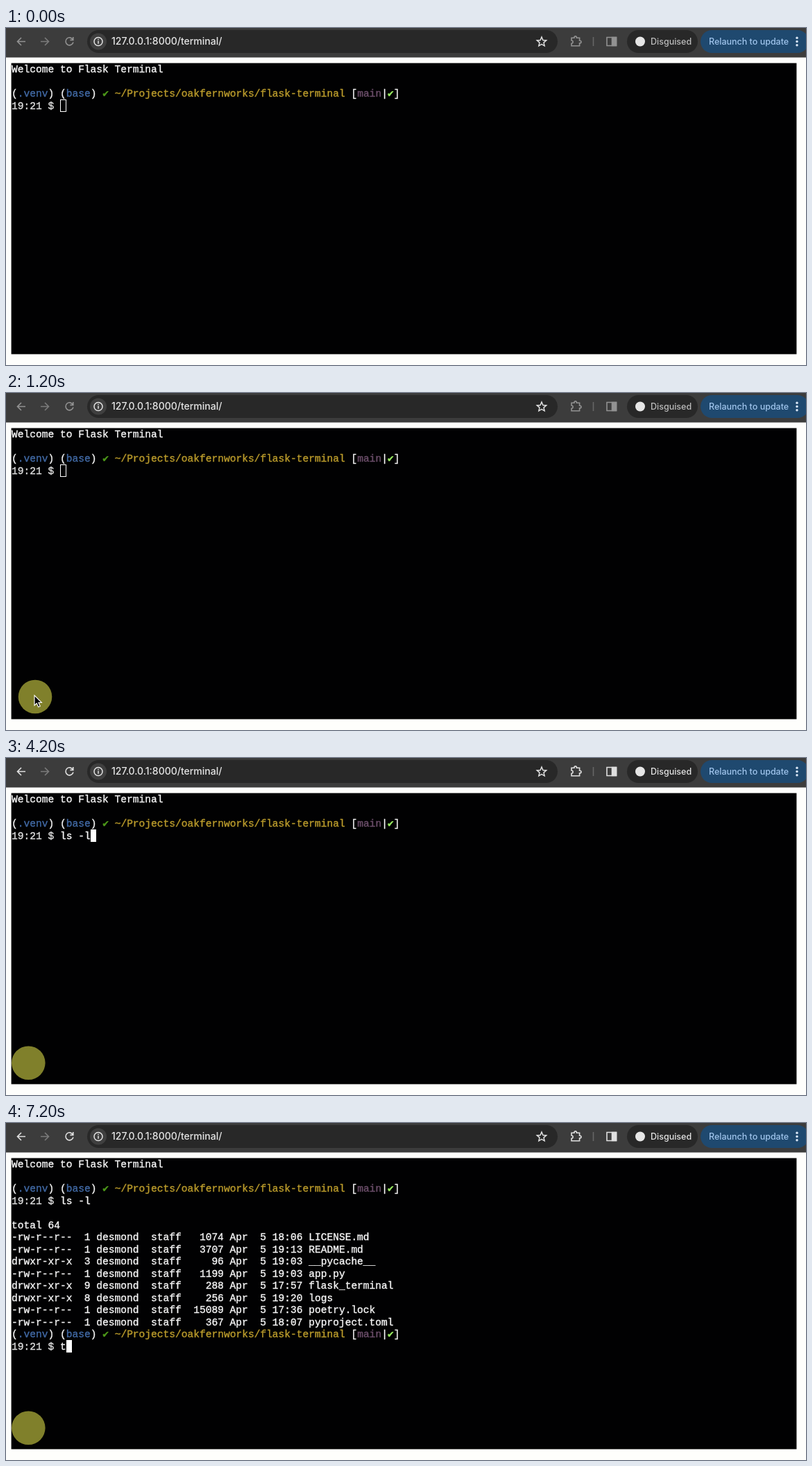
An HTML page for the animation above (8000 ms loop, 1153 by 486 pixels).

```html
<!DOCTYPE html>
<html lang="en">
<head>
<meta charset="utf-8">
<title>Flask Terminal</title>
<style>
  html, body { margin: 0; width: 100%; height: 100%; overflow: hidden; background: #fefefc; }
  #stage { position: relative; width: 1153px; height: 486px; overflow: hidden; }
  #stage > * { position: absolute; }
  svg { left: 0; top: 0; font: 500 12.5px Inter, Roboto, sans-serif; }
  pre {
    left: 8px; top: 52px; margin: 0; color: #f4f4f4;
    font: 14.57px/17.5px "Liberation Mono", "DejaVu Sans Mono", monospace;
    -webkit-text-stroke: .4px currentColor;
  }
  .env { color: #4169a4; } .ok { color: #4e9a1a; } .path { color: #b99a2b; }
  .branch { color: #6a4d68; } .clean { color: #9aed62; } .time { color: #dedede; }
  #caret { box-sizing: border-box; width: 8.7px; height: 17.5px; border: 1px solid #fff; }
  .focused #caret { background: #fff; }
  .tool { color: #929292; } .label { fill: #bcbcbc; }
  .focused .tool { color: #e0e0e0; } .focused .label { fill: #e4e4e4; }
</style>
</head>
<body>
<div id="stage">
  <svg width="1153" height="486" fill="none" stroke-width="1.6">
    <rect x="7.6" y="50.6" width="1131.8" height="419.8" fill="#010102"/>
    <rect width="1153" height="42.5" fill="#3c3c3c"/>
    <rect x="117" y="3" width="678" height="33" rx="16.5" fill="#282828"/>
    <circle cx="133" cy="19.5" r="12" fill="#3f3f3f"/>
    <rect x="895" y="3" width="102" height="33" rx="16.5" fill="#282828"/>
    <rect x="1001" y="3" width="156" height="33" rx="16.5" fill="#1f496f"/>
    <g class="tool" stroke="currentColor">
      <path d="M28 19.5H17M22 14l-5.5 5.5L22 25"/>
      <path d="M96.3 16.6A5.5 5.5 0 1 0 96.9 20.5M96.8 13v4.4h-4.4"/>
      <path d="M815 14.2h4v-.6a1.7 1.7 0 0 1 3.4 0v.6h4.2v4h.6a1.8 1.8 0 0 1 0 3.6h-.6v4H815v-3.6a2.1 2.1 0 0 0 0-4.2z"/>
      <path d="M866 13.5h13.5v12H866z"/>
      <path d="M873.5 13.5h6v12h-6z" fill="currentColor"/>
    </g>
    <path d="M50 19.5H61M56 14l5.5 5.5L56 25" stroke="#7b7b7b"/>
    <path d="M846.5 13v13" stroke="#666"/>
    <g stroke="#e2e2e2" stroke-width="1.5">
      <circle cx="133" cy="19.5" r="6"/>
      <path d="M133 18.6v4.2M133 15.8v1.5"/>
      <path d="M772 13l1.9 4.5 4.8.4-3.7 3.2 1.1 4.7-4.1-2.5-4.1 2.5 1.1-4.7-3.7-3.2 4.8-.4z"/>
    </g>
    <circle cx="914" cy="19.5" r="7" fill="#e6e6e6"/>
    <g fill="#d9e6f5">
      <circle cx="1140" cy="14.3" r="1.7"/><circle cx="1140" cy="19.5" r="1.7"/><circle cx="1140" cy="24.7" r="1.7"/>
    </g>
    <text x="152" y="24.4" font-size="14" fill="#e6e6e6">127.0.0.1:8000/terminal/</text>
    <text x="929" y="24.2" class="label">Disguised</text>
    <text x="1013" y="24.2" fill="#9fc4ec">Relaunch to update</text>
    <g id="pointer">
      <circle r="24.3" fill="#80802b"/>
      <path id="arrow" d="M-1-2v14.5l3.3-3 2.3 5.3 2.6-1.1-2.3-5.2h4.5z" fill="#000" stroke="#fff" stroke-width="1.1"/>
      <g id="beam">
        <path d="M-4-7.5q4 0 4 3v9q0 3-4 3M4-7.5q-4 0-4 3M4 7.5q-4 0-4-3M-2.5 2h5" stroke="#fff" stroke-width="3"/>
        <path d="M-4-7.5q4 0 4 3v9q0 3-4 3M4-7.5q-4 0-4 3M4 7.5q-4 0-4-3M-2.5 2h5" stroke="#111" stroke-width="1.2"/>
      </g>
    </g>
  </svg>
  <pre id="text"></pre>
  <div id="caret"></div>
</div>
<script>
const LOOP = 8000, FOCUS = 1600, ENTER = 5200;
const COLUMN = 8.743, ROW = 17.5;
const $ = id => document.getElementById(id);
const span = (cls, s) => `<span class="${cls}">${s}</span>`;

const prompt = `(${span('env', '.venv')}) (${span('env', 'base')}) ${span('ok', '✔')} ` +
  span('path', '~/Projects/oakfernworks/flask-terminal') +
  ` [${span('branch', 'main')}|${span('clean', '✔')}]\n${span('time', '19:21 $')} `;

const FILE = '-rw-r--r--', DIR = 'drwxr-xr-x';
const listing = [
  [FILE, 1, 1074, '18:06', 'LICENSE.md'],
  [FILE, 1, 3707, '19:13', 'README.md'],
  [DIR, 3, 96, '19:03', '__pycache__'],
  [FILE, 1, 1199, '19:03', 'app.py'],
  [DIR, 9, 288, '17:57', 'flask_terminal'],
  [DIR, 8, 256, '19:20', 'logs'],
  [FILE, 1, 15089, '17:36', 'poetry.lock'],
  [FILE, 1, 367, '18:07', 'pyproject.toml'],
].map(([mode, links, size, time, name]) =>
  `${mode}  ${links} desmond  staff${String(size).padStart(7)} Apr  5 ${time} ${name}\n`).join('');

// [time, key]
const keys = [[2600, 'l'], [2800, 's'], [3800, ' '], [4000, '-'], [4200, 'l'], [7200, 't']];
// [time, x, y]
const moves = [[800, 89, 163], [1000, 54, 160], [1200, 42, 438], [1600, 34, 437], [2200, 32.3, 439.7]];

const typed = (from, to) => keys.filter(([at]) => at >= from && at <= to).map(k => k[1]).join('');
const show = (id, on) => $(id).style.display = on ? '' : 'none';
let shown = '';

function draw(t) {
  const done = t >= ENTER;
  const first = typed(0, Math.min(t, ENTER - 1));
  const input = done ? typed(ENTER, t) : first;
  let text = 'Welcome to Flask Terminal\n\n' + prompt + first;
  if (done) text += `\n\ntotal 64\n${listing}${prompt}${input}`;
  if (text !== shown) $('text').innerHTML = shown = text;

  $('stage').classList.toggle('focused', t >= FOCUS);
  $('caret').style.left = 8 + (8 + input.length) * COLUMN + 'px';
  $('caret').style.top = 50.7 + (done ? 15 : 3) * ROW + 'px';

  const spot = moves.filter(([at]) => at <= t).pop();
  show('pointer', spot);
  if (spot) $('pointer').setAttribute('transform', `translate(${spot[1]} ${spot[2]})`);
  show('arrow', t < FOCUS);
  show('beam', t >= FOCUS && t < keys[0][0]);
}

const start = performance.now();
function tick() {
  draw((performance.now() - start) % LOOP);
  requestAnimationFrame(tick);
}
tick();
</script>
</body>
</html>
```
